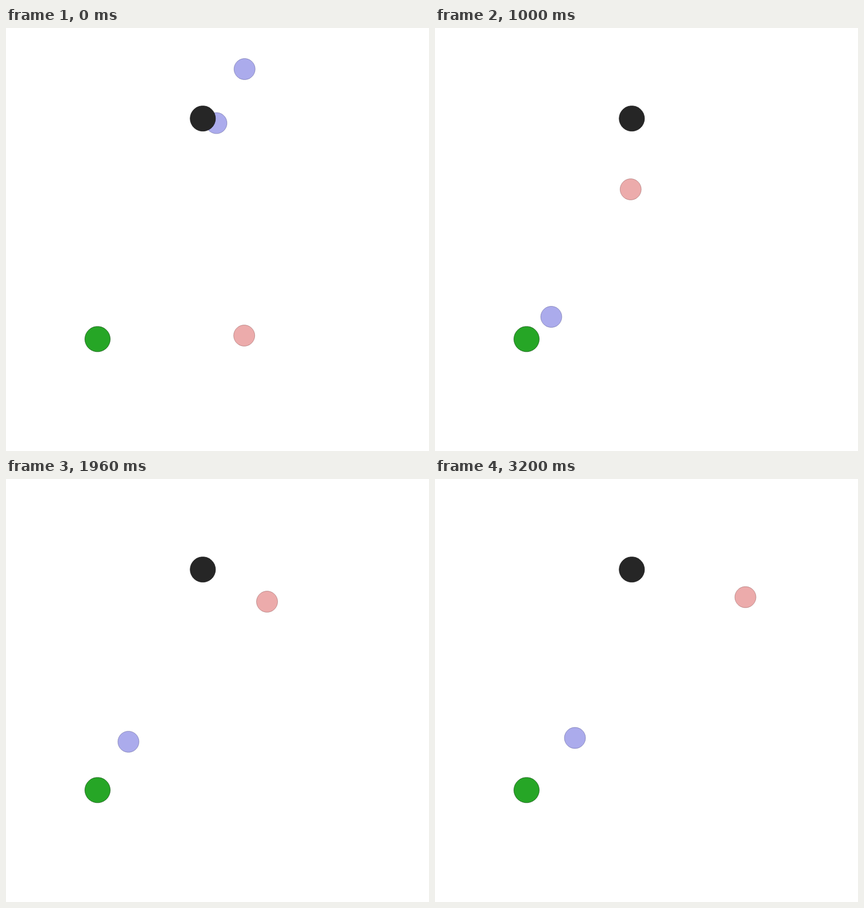
These frames come from a looping animation (700x700 px, 3.24 s). An HTML page:

```html
<!DOCTYPE html>
<html lang="en">
<head>
<meta charset="utf-8">
<title>Drifting discs</title>
<style>
  html, body { margin: 0; width: 100%; height: 100%; overflow: hidden; background: #fff; }
  svg { display: block; width: 100%; height: 100%; }
</style>
</head>
<body>
<svg id="stage" viewBox="0 0 700 700"></svg>
<script>
const LOOP = 3.24, STEP = 0.04, SIDES = 30;
const stage = document.getElementById('stage');

// Key points of both curves share these times, in seconds
const times = [0, 0.24, 0.52, 0.72, 1, 1.32, 1.96, 2.52, 3.2];
const red = {
  x: [394.2, 328, 249, 271, 323.8, 364.6, 432, 473.6, 513.7],
  y: [509, 467, 386.5, 328, 267, 232.2, 203, 195.8, 195.5]
};
const blue = {
  x: [348.2, 333, 288.2, 234, 192.4, 183.9, 202.6, 217.8, 231.6],
  y: [157.4, 253, 437, 505, 478, 458.2, 434.8, 428.9, 428.5]
};

const gap = i => times[i + 1] - times[i];
const speed = (values, i) => (values[i + 1] - values[i]) / gap(i);

// Starts at rest, keeps decelerating at the end
function slope(values, i) {
  if (i === 0) return 0;
  if (i === times.length - 1) return 2 * speed(values, i - 1) - slope(values, i - 1);
  return (speed(values, i - 1) * gap(i) + speed(values, i) * gap(i - 1)) / (gap(i - 1) + gap(i));
}

// Cubic Hermite curve through the key points
function along(values, t) {
  let i = 0;
  while (i < times.length - 2 && t >= times[i + 1]) i++;
  const u = (t - times[i]) / gap(i), v = 1 - u;
  return v * v * (1 + 2 * u) * values[i] + u * u * (3 - 2 * u) * values[i + 1] +
    gap(i) * u * v * (v * slope(values, i) - u * slope(values, i + 1));
}

const follow = curve => t => [along(curve.x, t), along(curve.y, t)];
const accelerateAway = t => [394.8 + 180 * t * t, 68 - 1500 * t * t];
const stay = (x, y) => () => [x, y];

function disc(position, radius, fill, stroke, opacity) {
  const shape = document.createElementNS('http://www.w3.org/2000/svg', 'polygon');
  const points = Array.from({ length: SIDES }, (_, i) => {
    const angle = 2 * Math.PI * i / SIDES;
    return `${radius * Math.cos(angle)},${radius * Math.sin(angle)}`;
  }).join(' ');
  const attributes = {
    points, fill, stroke, 'stroke-width': 0.7, 'fill-opacity': opacity, 'stroke-opacity': opacity
  };
  for (const name in attributes) shape.setAttribute(name, attributes[name]);
  stage.appendChild(shape);
  return { shape, position };
}

const agent = (position, fill, stroke) => disc(position, 17.5, fill, stroke, 0.5);
const landmark = (position, fill, stroke) => disc(position, 21, fill, stroke, 1);

const discs = [
  agent(follow(red), '#d95959', '#6c2d2d'),
  agent(accelerateAway, '#5959d9', '#2d2d6c'),
  agent(follow(blue), '#5959d9', '#2d2d6c'),
  landmark(stay(151.5, 514.8), '#26a626', '#135313'),
  landmark(stay(325.7, 149.8), '#262626', '#131313')
];

function draw(seconds) {
  const t = Math.floor((seconds % LOOP) / STEP + 1e-6) * STEP;
  for (const { shape, position } of discs) {
    shape.setAttribute('transform', `translate(${position(t).join(' ')})`);
  }
}

const start = performance.now();
function frame() {
  draw((performance.now() - start) / 1000);
  requestAnimationFrame(frame);
}
frame();
</script>
</body>
</html>
```
